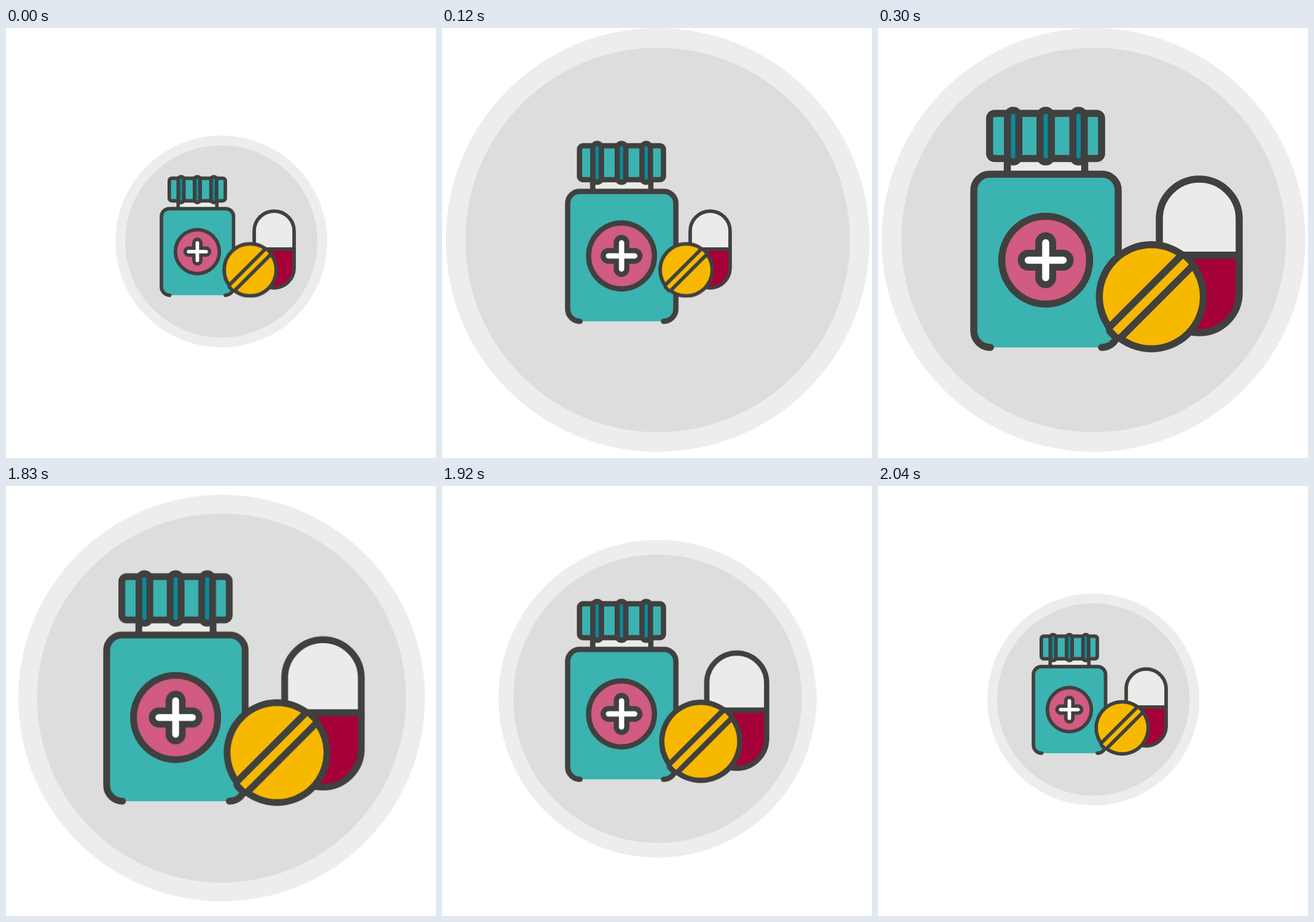
An HTML page without scripts for the animation above (2.7 s loop, 700 by 700 pixels).

```html
<!DOCTYPE html>
<html lang="en">
<head>
<meta charset="utf-8">
<title>Medicine icon</title>
<style>
  html, body { margin: 0; height: 100%; overflow: hidden; background: #fff; }
  svg { display: block; width: 100vw; height: 100vh; }

  .part {
    transform-origin: 350px 350px;
    animation: var(--enter) 2.7s steps(4) infinite, shrink 2.7s infinite;
  }
  .disc    { --enter: enter-disc; }
  .bottle  { --enter: enter-bottle; }
  .capsule { --enter: enter-capsule; }
  .tablet  { --enter: enter-tablet; }

  /* Parts grow one after another, 60 ms apart */
  @keyframes enter-disc    { 0%         { transform: scale(.5); } 4.444%, 100%  { transform: scale(1); } }
  @keyframes enter-bottle  { 0%, 2.222% { transform: scale(.5); } 6.666%, 100%  { transform: scale(1); } }
  @keyframes enter-capsule { 0%, 4.444% { transform: scale(.5); } 8.888%, 100%  { transform: scale(1); } }
  @keyframes enter-tablet  { 0%, 6.666% { transform: scale(.5); } 11.111%, 100% { transform: scale(1); } }

  /* All parts leave together */
  @keyframes shrink {
    0%           { scale: 1; animation-timing-function: step-end; }
    67.777%      { scale: .9595; animation-timing-function: steps(6); }
    74.444%      { scale: .5405; animation-timing-function: step-end; }
    75.555%, 100% { scale: .5; }
  }

  .outlined { stroke: #40403f; stroke-width: 11.5; stroke-linecap: round; stroke-linejoin: round; }
  .teal { fill: #3bb3b1; }
  .blue { fill: #0b8a9b; }
  .pale { fill: #ebebe9; }
  .pink { fill: #d15b81; }
  .red  { fill: #a60038; }
  .gold { fill: #f7b900; }
  .none { fill: none; }
</style>
</head>
<body>
<svg viewBox="0 0 700 700">
  <defs>
    <rect id="ridge" x="-9.25" y="134" width="18.5" height="84" rx="9"/>
    <path id="plus" d="M-28.5 0H28.5M0 -28.5V28.5"/>
  </defs>

  <g class="part disc">
    <circle cx="351" cy="345" r="345" fill="#ededed"/>
    <circle cx="351" cy="345" r="313" fill="#ddd"/>
  </g>

  <g class="part bottle outlined">
    <path class="pale" d="M210.5 238V212H336.5V238"/>
    <rect class="teal" x="181.7" y="139" width="182.3" height="73.5" rx="8"/>
    <g class="blue">
      <use href="#ridge" x="220"/>
      <use href="#ridge" x="273"/>
      <use href="#ridge" x="326.5"/>
    </g>
    <path class="teal" d="M183 520A27 27 0 0 1 156 493V264A26 26 0 0 1 182 238H365A26 26 0 0 1 391 264V493A27 27 0 0 1 364 520"/>
    <circle class="pink" cx="273" cy="378" r="71.5"/>
    <use href="#plus" x="273" y="378" stroke-width="34" style="stroke-width:34"/>
    <use href="#plus" x="273" y="378" style="stroke:#fff"/>
  </g>

  <g class="part capsule outlined">
    <path class="pale" d="M458 370V311A65 65 0 0 1 588 311V370Z"/>
    <path class="red" d="M458 370V431A65 65 0 0 0 588 431V370Z"/>
  </g>

  <g class="part tablet outlined">
    <circle class="gold" cx="445" cy="437.5" r="84.7"/>
    <rect class="gold" x="-87" y="-12.5" width="174" height="25" rx="7" transform="translate(444 437.5) rotate(-45)"/>
  </g>
</svg>
</body>
</html>
```
